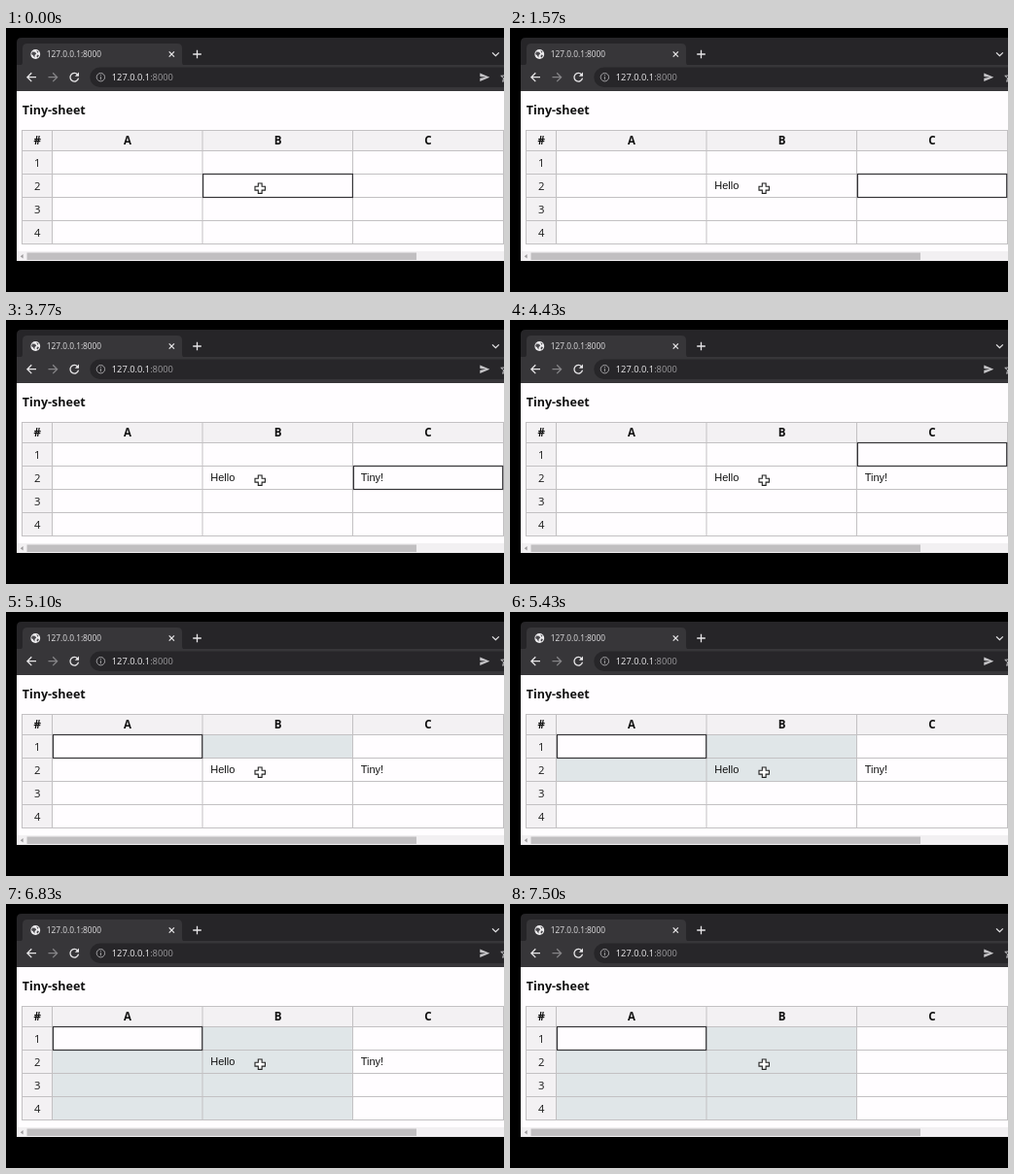
Write an HTML page that moves like this. It is 512 by 272 pixels and loops after 8000 ms.

```html
<!DOCTYPE html>
<html lang="en">
<head>
<meta charset="utf-8">
<title>Tiny-sheet</title>
<style>
  html, body { margin: 0; width: 100%; height: 100%; overflow: hidden; background: #000; }
  svg { display: block; width: 512px; height: 272px; }
  text { font-family: Ubuntu, "Open Sans", "Noto Sans", sans-serif; white-space: pre; }
  .head { font-size: 11.5px; font-weight: 700; text-anchor: middle; fill: #111; }
  .num { font-size: 11.3px; text-anchor: middle; fill: #1a1a1a; }
  .cell { font: 11px "Liberation Sans", Arial, sans-serif; fill: #111; }
  .icon { fill: none; stroke: #e6e5e7; stroke-width: 1.3; }
</style>
</head>
<body>
<svg viewBox="0 0 512 272">
  <rect width="512" height="272" fill="#000"/>
  <path d="M11 240V15q0-5 5-5H512V240z" fill="#262528"/>

  <!-- tab strip -->
  <path d="M13 39q4 0 4-4V21q0-5 5-5H176q5 0 5 5V35q0 4 4 4z" fill="#373639"/>
  <circle cx="30.3" cy="27" r="4.9" fill="#eeedef"/>
  <path d="M27 24.5l3 .3 1.2 1.6-1.6 1.5-.2 2.6-1.8-2.4-1.5-1zM31.3 23l2.2 1.5-1 1.2zM32 27.6l2 .4-1.4 2.4-1.2-1z" fill="#4b4a4e"/>
  <text x="41.8" y="30.1" font-size="8.3" fill="#e2e1e3">127.0.0.1:8000</text>
  <path class="icon" d="M167.7 24.4l5.2 5.2m0-5.2l-5.2 5.2M192.2 27h8.6m-4.3-4.3v8.6M500 25.4l3.4 3.3 3.4-3.3"/>

  <!-- toolbar -->
  <rect x="11" y="38" width="501" height="27" fill="#373639"/>
  <path d="M512 40.5H96.5a10.2 10.2 0 0 0 0 20.4H512z" fill="#272629"/>
  <path class="icon" d="M31 50.7h-9m4.3-4.4l-4.4 4.4 4.4 4.4"/>
  <path class="icon" style="stroke:#858487" d="M43.5 50.7h9m-4.3-4.4l4.4 4.4-4.4 4.4"/>
  <path class="icon" d="M73.6 48a4.3 4.3 0 1 0 .9 3.7"/>
  <path d="M75 45.6v4.2h-4.2z" fill="#e6e5e7"/>
  <circle class="icon" cx="97.4" cy="50.7" r="4.2" style="stroke:#a2a1a4;stroke-width:1"/>
  <path class="icon" style="stroke:#a2a1a4;stroke-width:1" d="M97.4 50v3.2m0-5.2v1.1"/>
  <text x="108.8" y="54.1" font-size="9.3" fill="#eeedef">127.0.0.1<tspan fill="#9b9a9d">:8000</tspan></text>
  <path d="M487.3 46.5l10 4.3-10 4.3v-3.4l6-.9-6-.9z" fill="#c6c5c8"/>
  <path class="icon" style="stroke:#c6c5c8;stroke-width:1" d="M514 45.6l-1.5 3.4-3.7.3 2.8 2.4-.9 3.6 3.3-1.9"/>

  <!-- page -->
  <rect x="11" y="65" width="501" height="175" fill="#fffdff"/>
  <text x="16.7" y="89" font-size="12.5" font-weight="700" fill="#111">Tiny-sheet</text>
  <path d="M16.5 105.5H511.5V126.5H47.5V222.5H16.5z" fill="#f3f1f3"/>
  <g id="shade" fill="#e0e6e8"></g>
  <path id="grid" fill="none" stroke="#c3c1c3"/>
  <g id="labels"></g>
  <rect id="sel" fill="none" stroke="#353437" stroke-width="1.2"/>
  <g id="texts"></g>
  <rect id="caret" y="157" width="1" height="12" fill="#444"/>

  <!-- scrollbar -->
  <rect x="11" y="230" width="501" height="10" fill="#f2f0f2"/>
  <rect x="21.5" y="231.5" width="400.5" height="7.5" fill="#c1bfc1"/>
  <path d="M17.6 233v4.6l-2.8-2.3z" fill="#9b999b"/>

  <!-- pointers -->
  <path id="plus" d="M259.3 160h3.8v3.3h3.3v3.8h-3.3v3.3h-3.8v-3.3H256v-3.8h3.3z" fill="#fff" stroke="#222" stroke-width="1.1"/>
  <path id="beam" d="M258.8 160.2q2.4 0 2.4 1.2 0-1.2 2.4-1.2M261.2 161v9M258.8 170.6q2.4 0 2.4-1.2 0 1.2 2.4 1.2" fill="none" stroke="#222"/>
</svg>
<script>
const LOOP = 8000;
const colX = [47.5, 202, 356.5, 511.5];
const rowY = [126.5, 150.5, 174.5, 198.5, 222.5];
const selX = { A: [48.5, 201.7], B: [202.6, 356.4], C: [357.4, 510.7] };
const $ = id => document.getElementById(id);
const col = key => "ABC".indexOf(key[0]);
const row = key => key[1] - 1;

function add(parent, tag, attrs, text = "") {
  const el = document.createElementNS("http://www.w3.org/2000/svg", tag);
  for (const k in attrs) el.setAttribute(k, attrs[k]);
  el.textContent = text;
  return parent.appendChild(el);
}

// Each step changes part of the sheet; the rest carries over.
const steps = [[0, { sel: "B2", range: [], edit: "", cells: {} }]];
const step = (t, change) => steps.push([t, change]);
const type = (key, word, times) => times.forEach((t, i) =>
  step(t, { edit: key, cells: { [key]: word.slice(0, i + 1) } }));
const tiled = (a, b) => Object.fromEntries([1, 2, 3, 4].flatMap(r => [["A" + r, a], ["B" + r, b]]));

type("B2", "Hello", [500, 770, 900, 1030, 1230]);
step(1570, { edit: "", sel: "C2" });
type("C2", "Tiny!", [2300, 2430, 2570, 2770, 3100]);
step(3370, { edit: "", sel: "C3" });
step(3770, { sel: "C2" });
step(3970, { range: ["B2"] });
step(4430, { sel: "C1", range: [] });
step(4630, { sel: "B1" });
step(4770, { sel: "A1" });
step(5100, { range: ["B1"] });
step(5430, { range: ["B1", "A2", "B2"] });
step(5770, { range: ["B1", "A2", "B2", "A3", "B3", "A4", "B4"] });
step(6030, { cells: tiled("Hello", "Tiny!") });
step(6830, { cells: { ...tiled("", ""), B2: "Hello" } });
step(7100, { cells: { C2: "" } });
step(7500, { cells: { B2: "" } });

function stateAt(count) {
  return steps.slice(0, count).reduce((s, [, c]) =>
    ({ ...s, ...c, cells: { ...s.cells, ...c.cells } }), {});
}

function draw({ sel, range, edit, cells }) {
  $("shade").replaceChildren();
  for (const key of range) {
    const x = colX[col(key)], y = rowY[row(key)];
    add($("shade"), "rect", { x, y, width: colX[col(key) + 1] - x, height: 24 });
  }

  const [x1, x2] = selX[sel[0]];
  const box = { x: x1, y: rowY[row(sel)], width: x2 - x1, height: 24 };
  for (const k in box) $("sel").setAttribute(k, box[k]);

  $("texts").replaceChildren();
  for (const key in cells) {
    if (!cells[key]) continue;
    const x = colX[col(key)] + 8.2;
    const el = add($("texts"), "text", { class: "cell", x, y: rowY[row(key)] + 15.8 }, cells[key]);
    if (key === edit) $("caret").setAttribute("x", x + el.getComputedTextLength());
  }
  const show = (id, on) => { $(id).style.display = on ? "" : "none"; };
  show("caret", edit);
  show("beam", edit === "B2");
  show("plus", edit !== "B2");
}

$("grid").setAttribute("d",
  [16.5, ...colX].map(x => `M${x} 105V223`).join("") +
  [105.5, ...rowY].map(y => `M16 ${y}H512`).join(""));
add($("labels"), "text", { class: "head", x: 32.3, y: 120.2 }, "#");
[..."ABC"].forEach((c, i) => add($("labels"), "text", { class: "head", x: 125 + 154.5 * i, y: 120.2 }, c));
for (let r = 1; r < 5; r++) add($("labels"), "text", { class: "num", x: 32.2, y: 119 + 24 * r }, r);

let shown = 0;
const start = performance.now();
function frame() {
  const t = (performance.now() - start) % LOOP;
  const count = steps.filter(s => s[0] <= t).length;
  if (count !== shown) draw(stateAt(shown = count));
  requestAnimationFrame(frame);
}
frame();
</script>
</body>
</html>
```
